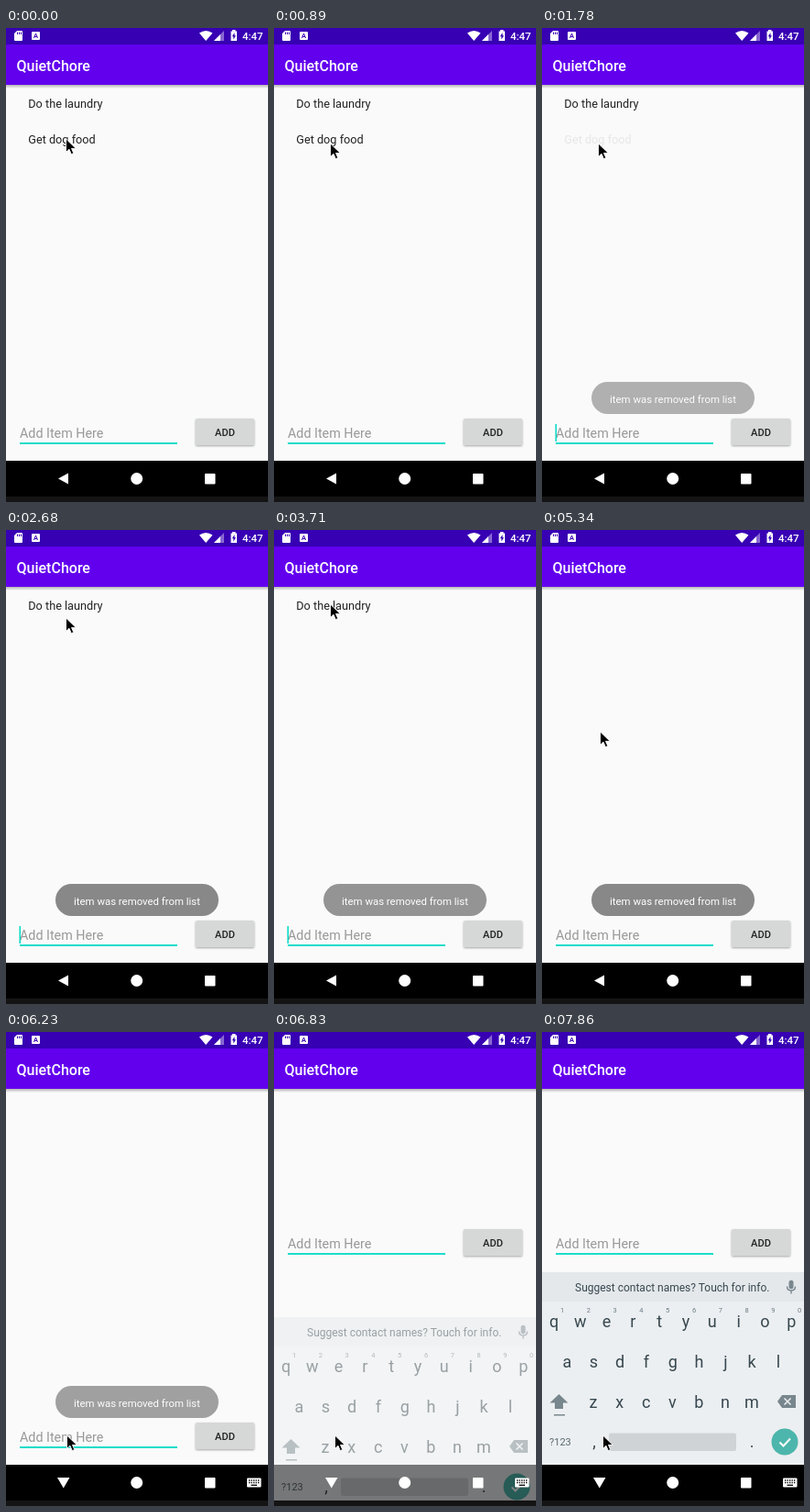
An HTML page that plays this animation: 286x517 px, repeating every 8 s.

```html
<!DOCTYPE html>
<html lang="en">
<head>
<meta charset="utf-8">
<title>To-do list</title>
<style>
  html, body { margin: 0; width: 100%; height: 100%; overflow: hidden; background: #fafafa; }
  svg { display: block; width: 286px; height: 517px; font-family: Roboto, sans-serif; }
  .med { font-weight: 500; }
  .mid { text-anchor: middle; }
  #laundry, #food, #toast, #caret, #back, #down, #form, #keyboard, #pointer {
    animation: 8s step-end infinite;
  }
  #food { animation-name: food; }
  #laundry { animation-name: laundry; }
  #toast { animation-name: toast; }
  #caret { animation-name: caret; }
  #back { animation-name: back; }
  #down { animation-name: down; }
  #form { animation-name: form; }
  #keyboard { animation-name: keyboard; }
  #pointer { animation-name: pointer; }

  @keyframes food {
    0% { opacity: 1 } 22.25% { opacity: .09 } 24.125%, 100% { opacity: 0 }
  }
  @keyframes laundry {
    0% { opacity: 1 } 57.625% { opacity: .93 } 59.5%, 100% { opacity: 0 }
  }
  @keyframes toast {
    0% { opacity: 0 }
    22.25% { opacity: .65 } 24.125% { opacity: .92 } 26% { opacity: 1 }
    44.5% { opacity: .97 } 46.375% { opacity: .89 } 48.25% { opacity: .45 } 50.125% { opacity: 0 }
    57.625% { opacity: .7 } 59.5% { opacity: .93 } 61.375% { opacity: 1 }
    76% { opacity: .96 } 77.875% { opacity: .79 } 79.75% { opacity: .35 }
    81.625%, 100% { opacity: 0 }
  }
  @keyframes caret {
    0%, 11.125%, 26%, 39%, 50.125%, 63.25%, 74.125%, 85.375%, 98.25%, 100% { opacity: 0 }
    5.5%, 22.25%, 31.625%, 44.5%, 57.625%, 68.75%, 79.75%, 92.75% { opacity: 1 }
  }
  @keyframes back { 0% { opacity: 1 } 76%, 100% { opacity: 0 } }
  @keyframes down { 0% { opacity: 0 } 76%, 100% { opacity: 1 } }
  @keyframes form {
    0% { transform: none } 85.375%, 100% { transform: translateY(-211px) }
  }
  @keyframes keyboard {
    0% { opacity: 0; transform: translateY(49px) }
    85.375% { opacity: .5; transform: translateY(49px) }
    87.125%, 100% { opacity: 1; transform: none }
  }
  @keyframes pointer {
    0% { transform: translate(66px, 121px) }
    1.75% { transform: translate(66px, 122px) }
    3.625% { transform: translate(65px, 123px) }
    5.5% { transform: translate(64px, 124px) }
    7.375% { transform: translate(63px, 125px) }
    9.25% { transform: translate(62px, 126px) }
    11.125% { transform: translate(62px, 126px) }
    29.75% { transform: translate(63px, 122px) }
    31.625% { transform: translate(65px, 110px) }
    33.5% { transform: translate(66px, 96px) }
    35.375% { transform: translate(65px, 86px) }
    37.25% { transform: translate(63px, 82px) }
    39% { transform: translate(62px, 81px) }
    63.25% { transform: translate(62px, 112px) }
    65% { transform: translate(64px, 220px) }
    66.875% { transform: translate(66px, 350px) }
    68.75% { transform: translate(67px, 440px) }
    70.5% { transform: translate(67px, 455px) }
    74.125% { transform: translate(67px, 445px) }
    76%, 100% { transform: translate(67px, 440px) }
  }
</style>
</head>
<body>
<svg viewBox="0 0 286 517">
  <defs>
    <linearGradient id="shade" x2="0" y2="1">
      <stop stop-opacity=".28"/><stop offset="1" stop-opacity="0"/>
    </linearGradient>
    <filter id="lift" x="-10%" y="-20%" width="120%" height="150%">
      <feDropShadow dx="0" dy="1" stdDeviation=".9" flood-opacity=".35"/>
    </filter>
    <clipPath id="screen"><path d="M0 0H286V511H0z"/></clipPath>
  </defs>

  <path fill="#fafafa" d="M0 0H286V517H0z"/>
  <path fill="url(#shade)" d="M0 62H286V66H0z"/>
  <path fill="#6200ee" d="M0 18H286V62H0z"/>
  <path fill="#3700b3" d="M0 0H286V18H0z"/>

  <!-- status bar -->
  <g fill="#fff">
    <path d="M12 3H17Q18 3 18 4V13Q18 14 17 14H10Q9 14 9 13V6z"/>
    <path stroke="#3700b3" d="M12.5 4.5V7M14.5 4.5V7M16.5 4.5V7"/>
    <rect x="28" y="4" width="9" height="9" rx="1"/>
    <path fill="none" stroke="#3700b3" d="M30.5 11L32.5 6L34.5 11M31.2 9.5H33.8"/>
    <path d="M211 5.5Q218.2 .5 225.5 5.5L218.2 14z"/>
    <path opacity=".4" d="M227 14L238 3V14z"/>
    <path d="M227 14L234 7V14z"/>
    <path d="M247 2H250.500V3.500H252V14H245.500V3.500H247z"/>
    <path fill="#3700b3" d="M249.500 5L246.700 9.300H248.300V12.500L251 8.200H249.500z"/>
    <text class="med" x="258" y="13" font-size="11.500">4:47</text>
    <text class="med" x="11.500" y="46.500" font-size="16">QuietChore</text>
  </g>

  <g font-size="12.700" fill="#222">
    <text id="laundry" x="24.300" y="87">Do the laundry</text>
    <text id="food" x="24.300" y="125.500">Get dog food</text>
  </g>

  <g id="form">
    <text x="15" y="446.500" font-size="14.300" fill="#989898">Add Item Here</text>
    <path fill="#1ddcca" d="M15 452H187V454H15z"/>
    <path id="caret" fill="#03dac5" d="M14.500 432H16V451H14.500z"/>
    <rect x="207" y="426" width="64" height="29" rx="1.500" fill="#d6d7d7" filter="url(#lift)"/>
    <text class="med mid" x="239" y="444.700" font-size="11.100" fill="#222">ADD</text>
  </g>

  <g id="toast">
    <rect x="54" y="386" width="178" height="35" rx="17.500" fill="#888"/>
    <text class="mid" x="143" y="408.500" font-size="11.400" fill="#fff">item was removed from list</text>
  </g>

  <path d="M0 472H286V517H0z"/>

  <g clip-path="url(#screen)">
    <g id="keyboard" fill="#37474f">
      <path fill="#eceff1" d="M0 262H286V472H0z"/>
      <path fill="#e4e8eb" d="M0 262H286V294H0z"/>
      <text x="36" y="283" font-size="12">Suggest contact names? Touch for info.</text>
      <g fill="none" stroke="#78868d" stroke-width="1.400">
        <rect x="270.200" y="271.500" width="3.600" height="8" rx="1.800" fill="#78868d"/>
        <path d="M267.500 277.500Q267.500 282 272 282T276.500 277.500M272 282V285.500"/>
      </g>
      <g id="keys" class="mid" font-size="18"></g>
      <g fill="#78868d">
        <path d="M18.500 395L28.500 404.500H23V411H14V404.500H8.500z"/>
        <path d="M13 417H25V418.500H13z"/>
        <path d="M262 396H277V410H262L257 403z"/>
      </g>
      <path stroke="#eceff1" stroke-width="1.500" d="M264.500 399.500L271.500 406.500M271.500 399.500L264.500 406.500"/>
      <text x="8" y="451" font-size="11" fill="#596970">?123</text>
      <rect x="73" y="437.500" width="139" height="19.500" rx="2" fill="#cfd3d5"/>
      <circle cx="265" cy="447" r="14.500" fill="#4db6ac"/>
      <path fill="none" stroke="#fff" stroke-width="2" d="M259.500 447.500L263.500 451.500L271 443.500"/>
    </g>
  </g>

  <path fill="#141414" d="M0 511H286V517H0z"/>

  <!-- navigation bar -->
  <g fill="#fff">
    <path id="back" d="M57 491.500L68 485.500V497.500z"/>
    <g id="down">
      <path d="M56 486H69.500L62.750 497.500z"/>
      <rect x="263" y="486.500" width="15.500" height="10" rx="1"/>
      <path stroke="#000" stroke-width="1.300" stroke-dasharray="1.300 1.200" d="M265 489H277M265 491.500H277"/>
      <path stroke="#000" stroke-width="1.300" d="M267.500 494.300H274"/>
    </g>
    <circle cx="142.700" cy="491.500" r="6.500"/>
    <rect x="217" y="486" width="11.500" height="11.500" rx=".8"/>
  </g>

  <path id="pointer" stroke="#fff" stroke-width=".9" d="M-.5 0V14.500L3 11.300L5.300 16.700L7.800 15.600L5.500 10.400H10.300z"/>
</svg>
<script>
  const keys = document.getElementById('keys');
  const pitch = 28.8;

  function label(text, x, y, attrs = {}) {
    const el = document.createElementNS('http://www.w3.org/2000/svg', 'text');
    for (const [name, value] of Object.entries({ x, y, ...attrs })) el.setAttribute(name, value);
    el.textContent = text;
    keys.append(el);
  }

  function row(text, x, y, attrs) {
    [...text].forEach((ch, i) => label(ch, x + i * pitch, y, attrs));
  }

  row('qwertyuiop', 13, 322);
  row('1234567890', 22, 306, { 'font-size': 7.5, fill: '#6b7b83' });
  row('asdfghjkl', 27.5, 365.5);
  row('zxcvbnm', 56, 410);
  label(',', 57, 453);
  label('.', 229, 453);
</script>
</body>
</html>
```
